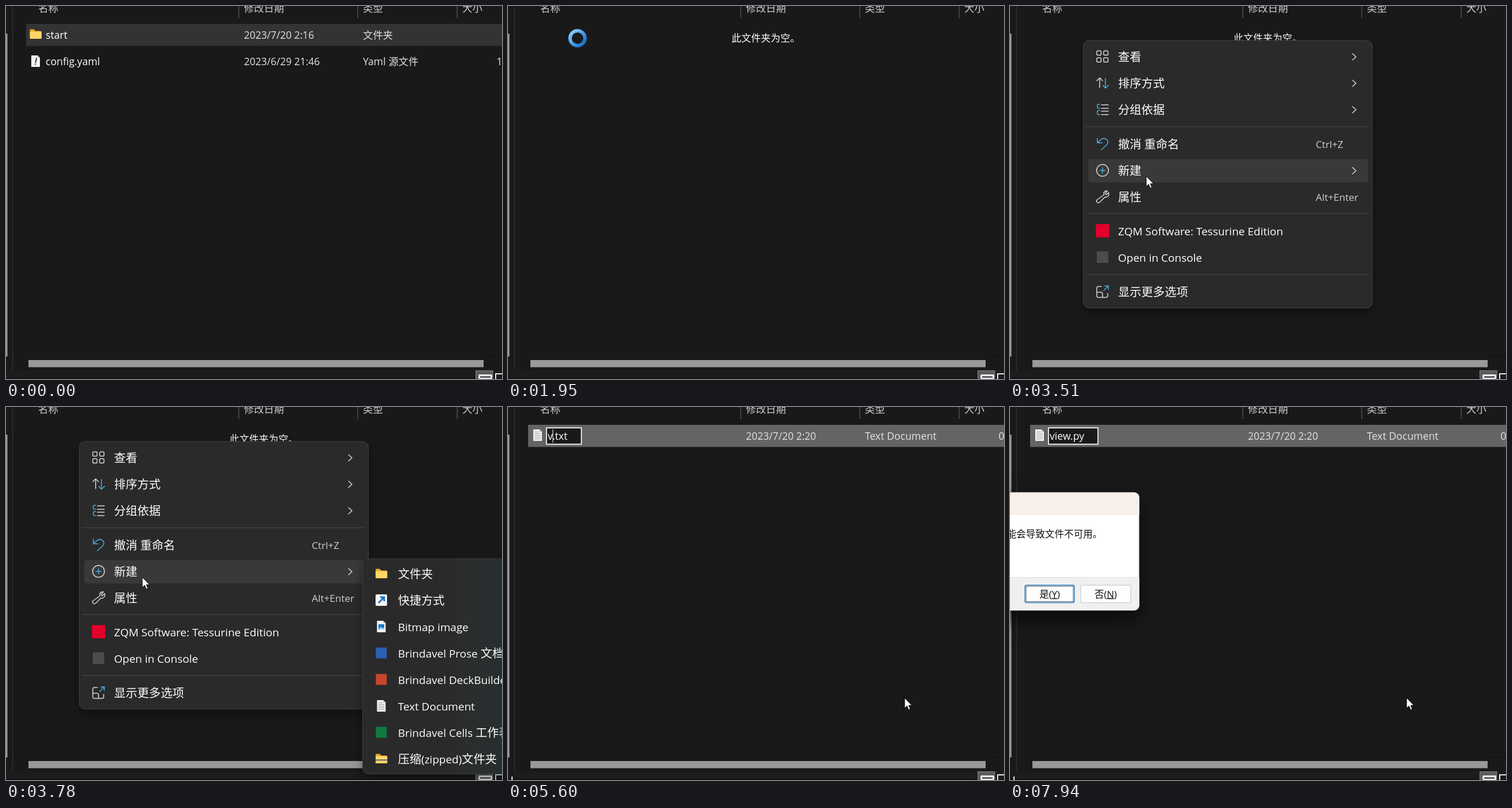
Animation of 863 by 649 pixels, one loop 8 s. Source, as an HTML page:

```html
<!DOCTYPE html>
<html lang="zh-CN">
<head>
<meta charset="utf-8">
<title>File list</title>
<style>
html, body { margin: 0; width: 100%; height: 100%; overflow: hidden; background: #191919; }
svg { display: block; width: 100vw; height: 100vh; }
text { font-family: "Open Sans", "Noto Sans CJK SC", "Noto Sans CJK", sans-serif; white-space: pre; }
.line { fill: none; stroke: #d6d6d6; stroke-width: 1.5; stroke-linecap: round; stroke-linejoin: round; }
.blue { stroke: #4cb0e0; }
</style>
</head>
<body>
<svg id="stage" viewBox="0 0 863 649" preserveAspectRatio="none" xmlns="http://www.w3.org/2000/svg"></svg>
<script>
const LOOP = 8000, STEP = 67.4, LEAD = 18;
const stage = document.getElementById('stage');

// Latin and CJK runs use slightly different sizes.
function label(x, y, str, fill = '#fff', latin = 17.7, cjk = 17.4, extra = '') {
  const runs = str.split(/([\u3000-\u9fff]+)/).filter(Boolean).map(run =>
    `<tspan font-size="${/[\u3000-\u9fff]/.test(run) ? cjk : latin}">${run}</tspan>`);
  return `<text x="${x}" y="${y}" fill="${fill}" ${extra}>${runs.join('')}</text>`;
}
const rect = (x, y, w, h, fill, extra = '') =>
  `<rect x="${x}" y="${y}" width="${w}" height="${h}" fill="${fill}" ${extra}/>`;
const line = (d, cls = '') => `<path class="line ${cls}" d="${d}"/>`;
const group = (id, body, extra = '') => `<g id="${id}" ${extra}>${body}</g>`;
const at = (x, y, body) => `<g transform="translate(${x} ${y})">${body}</g>`;

// Icons are drawn around their own centre.
const folder = '<path d="M-10 -7q0 -1.5 1.5 -1.5h5.5l3 3h8.500q1.500 0 1.500 1.500v4h-20z" fill="#e8a826"/>' +
  rect(-10, -4.5, 20.5, 12.5, '#ffd666', 'rx="1.3"');
const page = '<path d="M-7.500 -10h11l4 4v16h-15z" fill="#f4f4f4"/><path d="M3.500 -10v4h4z" fill="#bbb"/>';
const textPage = page +
  [-6, -3, 0, 3, 6].map(y => rect(-5.5, y, y < -5 ? 8 : 11, 1, '#999')).join('');
const square = (fill, size) => rect(-size / 2, -size / 2, size, size, fill);

const icons = {
  view: [-10, 2].map(x => [-10, 2].map(y =>
    `<rect class="line" x="${x}" y="${y}" width="7.500" height="7.500" rx="1.800"/>`).join('')).join(''),
  sort: line('M-5 8V-9M-10 -4L-5 -9L0 -4') + line('M5 -8V9M0.500 4L5 9L10.500 4', 'blue'),
  list: line('M-2 -8H10M-2 -2H10M-2 3H10M-2 9H10') +
    line('M-5 -9h-2q-2 0 -2 2v3q0 2 2 2h2M-5 2h-2q-2 0 -2 2v3q0 2 2 2h2', 'blue'),
  undo: line('M-9 -10V-2H-1M-9 -2L-3 -7.500Q3 -12 8 -7Q11 -2 7 2L-2 10', 'blue'),
  plus: '<circle class="line" r="10.300"/>' + line('M-4.500 0H4.500M0 -4.500V4.500', 'blue'),
  wrench: line('M2.500 -3.500Q1 -8 5 -10Q7 -11 8.500 -10.300L4.500 -6L6.500 -3.500L10.500 -7.500Q12 -3 9 -0.500Q7 1 4 0.500L-5 9.500Q-7.500 11.500 -9.700 9.300Q-11.300 7 -9.300 5Z'),
  app: square('#e4002b', 23),
  shell: square('#4c4c4c', 20),
  more: line('M-2 -9H-7q-3 0 -3 3V7q0 3 3 3H6q3 0 3 -3V3M-10 1h7q3 0 3 3v6') +
    line('M2 -2L10 -10M4 -10H10V-4', 'blue'),
};

const menuItems = [
  [89, 'view', '查看', '>'], [135, 'sort', '排序方式', '>'], [181, 'list', '分组依据', '>'],
  [241, 'undo', '撤消 重命名', 'Ctrl+Z'], [287, 'plus', '新建', '>'], [333, 'wrench', '属性', 'Alt+Enter'],
  [392, 'app', 'ZQM Software: Tessurine Edition'], [438, 'shell', 'Open in Console'], [498, 'more', '显示更多选项'],
];
const newItems = [
  ['文件夹', folder],
  ['快捷方式', rect(-10, -10, 20, 20, '#f5f5f5', 'rx="2"') +
    '<path d="M-5 5L4 -4M-2 -5H5V2" fill="none" stroke="#1573c9" stroke-width="2.800"/>'],
  ['Bitmap image', page + rect(-5, -4, 10, 9, '#1e78d0') + '<path d="M-5 5l4 -5 3 3 1.500 -1.500 1.500 2v1.500z" fill="#8fd0ff"/>'],
  ['Brindavel Prose 文档', square('#2b5fb4', 19)],
  ['Brindavel DeckBuilder', square('#c8452a', 19)],
  ['Text Document', textPage],
  ['Brindavel Cells 工作表', square('#107c41', 19)],
  ['压缩(zipped)文件夹', folder + rect(-10, 1, 20.5, 2.5, '#777')],
].map((item, i) => [291 + 46 * i, ...item]);

const menuRow = ([y, icon, name, tail]) => at(161, y - 1, icons[icon]) +
  label(188, y + 7.3, name, '#fff', 19, 20.3) +
  (tail === '>' ? line(`M596 ${y - 6}l6 5.500l-6 5.500`) : tail ? label(532, y + 6, tail, '#cfcfcf', 17.2) : '');

const fileRow = (y, date, type, size) => label(414, y, date, '#e2e2e2', 17.5) +
  label(621, y, type, '#e2e2e2') + label(853.5, y, size, '#e2e2e2');

const button = (x, w, word, key, edge) =>
  rect(x, 310, w, 30.5, '#fdfdfd', `rx="3" stroke="${edge}" stroke-width="1.500"`) +
  `<text x="${x + w / 2}" y="331.500" font-size="16.600" text-anchor="middle" fill="#111">${word}(<tspan text-decoration="underline">${key}</tspan>)</text>`;

stage.innerHTML = `<defs>
  <filter id="soft" x="-20%" y="-20%" width="140%" height="150%"><feDropShadow dx="0" dy="8" stdDeviation="9" flood-opacity=".4"/></filter>
  <filter id="deep" x="-40%" y="-40%" width="180%" height="200%"><feDropShadow dx="0" dy="16" stdDeviation="18" flood-opacity=".6"/></filter>
  <linearGradient id="panel"><stop offset=".5" stop-color="#2c2c2c"/><stop offset="1" stop-color="#253132"/></linearGradient>
  <linearGradient id="spin" x2="1" y2="1"><stop stop-color="#8fd3ff"/><stop offset="1" stop-color="#0a66c8"/></linearGradient>
  <clipPath id="card"><rect x="-40" y="148.500" width="265" height="205.500" rx="9"/></clipPath>
</defs>` +
  rect(0, 0, 863, 649, '#191919') +
  rect(0, 634, 863, 15, '#1c1c1c') + rect(0, 647.5, 863, 1.5, '#100c0c') +
  rect(-3, 48, 5.5, 562, '#9a9a9a', 'rx="1"') + rect(10.5, 0, 2, 634, '#2b2b2b') +
  [[56, '名称'], [414, '修改日期'], [621, '类型'], [794, '大小']].map(h => label(h[0], 10, h[1], '#d0d0d0')).join('') +
  [405, 612, 785].map(x => rect(x - 0.5, 0, 1, 21, '#6a6a6a')).join('') +
  rect(831, 609, 32, 1, '#101010') + rect(39, 616, 792, 12.5, '#999') +
  rect(817.5, 634.5, 29.5, 20, '#5c5c5c', 'stroke="#858585"') +
  rect(822, 641, 24, 8, '#e8e8e8', 'rx="2"') + rect(825, 644.5, 18, 2, '#222') +
  rect(852, 640, 14, 12, 'none', 'stroke="#e8e8e8" stroke-width="2"') +
  group('files', rect(35, 31, 828, 38.5, '#333', 'id="row"') + at(51.5, 49, folder) +
    label(69, 56.5, 'start') + fileRow(56.5, '2023/7/20 2:16', '文件夹', '') +
    at(51.5, 96, page + '<path d="M1.500 -5L0 2M-0.600 5v0.500" stroke="#333" stroke-width="2" stroke-linecap="round"/>') +
    label(69, 103, 'config.yaml') + fileRow(103, '2023/6/29 21:46', 'Yaml 源文件', '1')) +
  group('empty', label(389, 61.5, '此文件夹为空。', '#fff', 17, 17)) +
  group('draft', rect(35, 31, 828, 38.5, '#646464') + at(51.5, 49, textPage) +
    fileRow(56.5, '2023/7/20 2:20', 'Text Document', '0') + rect(6, 643, 2, 6, '#eee') +
    rect(67, 36.3, 62, 28.4, '#191919', 'id="field" stroke="#fff" stroke-width="1.700"') +
    rect(69, 39, 0, 23, '#0078d7', 'id="mark"') +
    '<text id="name" x="69" y="56.500" font-size="17.700" fill="#fff"></text>' +
    rect(69, 39, 1, 23, '#fff', 'id="caret"')) +
  group('menu', rect(127.5, 60, 503, 465.5, '#2c2c2c', 'rx="10" stroke="#404040" filter="url(#soft)"') +
    rect(136, 0, 487, 40.5, '#393939', 'id="hover" rx="5"') +
    [210, 361, 467].map(y => rect(132, y - 0.5, 492, 1.3, '#434343')).join('') + menuItems.map(menuRow).join('')) +
  group('sub', rect(620.5, 264, 300, 374.5, 'url(#panel)', 'rx="10" stroke="#3c3c3c" filter="url(#soft)"') +
    rect(628, 0, 270, 40.5, '#3a3d3d', 'id="pick" rx="5"') +
    newItems.map(([y, name, icon]) => at(653, y - 1, icon) + label(682, y + 7.3, name, '#fff', 19, 20.3)).join('')) +
  group('dialog', rect(-40, 148.5, 265, 205.5, '#fff', 'rx="9" stroke="#3d463d" filter="url(#deep)"') +
    `<g clip-path="url(#card)">${rect(-40, 148, 270, 40, '#f9f0ec')}${rect(-40, 296, 270, 60, '#f0f0f0')}${rect(-40, 296, 270, 1, '#dfdfdf')}</g>` +
    label(-5.5, 227, '能会导致文件不可用。', '#111', 16.6, 16.6) +
    button(26, 86, '是', 'Y', '#2b80c5') + rect(28, 312, 82, 26.5, 'none', 'stroke="#333" stroke-width=".8"') +
    button(123, 87, '否', 'N', '#d2d2d2')) +
  group('ring', '<circle r="13" fill="none" stroke="url(#spin)" stroke-width="6"/>') +
  group('pointer', '<path d="M0 0V18.200L4.200 14.300L7.100 21L10 19.700L7.200 13.200H12.800Z" fill="#fff" stroke="#000" stroke-width="1"/>');

const el = {};
stage.querySelectorAll('[id]').forEach(node => el[node.id] = node);
const set = (node, attrs) => { for (const k in attrs) node.setAttribute(k, attrs[k]); };

// step, x, y
const path = [
  [4, 845, 598], [6, 600, 420], [8, 390, 260], [10, 240, 143], [12, 127, 61], [13, 122, 57], [14, 122, 57], [15, 121, 57],
  [40, 121, 57], [41, 129, 80], [44, 175, 165], [47, 222, 282], [49, 237, 316], [52, 237, 296],
  [56, 237, 296], [60, 570, 312], [62, 662, 390], [64, 690, 508], [70, 690, 508], [71, 690, 506],
];
// step, name, caret index (-1: hidden), selected length
const typing = [
  [71, 'New Text Document.txt', 17, 17], [79, 'New Text Document.txt', -1, 17],
  [83, 'v.txt', 1], [85, 'vi.txt', 2], [86, 'vie.txt', 3], [88, 'view.txt', 4], [94, 'view.txt', 8],
  [99, 'view.tx', 7], [102, 'view.t', 6], [104, 'view.', 5], [110, 'view.p', 6], [112, 'view.py', 7], [117, 'view.py', -1],
];

function pointerAt(s) {
  const i = path.findIndex(p => p[0] > s);
  if (i < 0) return path[path.length - 1].slice(1);
  if (i === 0) return path[0].slice(1);
  const a = path[i - 1], b = path[i], k = (s - a[0]) / (b[0] - a[0]);
  return [a[1] + (b[1] - a[1]) * k, a[2] + (b[2] - a[2]) * k];
}

const opening = (s, from) => [0.5, 0.85][s - from] ?? (s < from ? 0 : 1);
const rowUnder = (items, y) => items.find(item => Math.abs(item[0] - y) <= 20.5);

function highlight(node, item) {
  set(node, item ? { y: item[0] - 20.5, opacity: 1 } : { opacity: 0 });
}

function drawName(s) {
  const [, name, caret, picked = 0] = typing.filter(k => k[0] <= s).pop() || typing[0];
  const widthOf = n => n > 0 ? el.name.getSubStringLength(0, n) : 0;
  el.name.textContent = name;
  set(el.field, { width: el.name.getComputedTextLength() + 26 });
  set(el.mark, { width: widthOf(picked) });
  set(el.caret, { x: 69 + widthOf(caret), opacity: caret < 0 ? 0 : 1 });
}

function update(t) {
  const s = Math.floor((t + LEAD) / STEP);
  const [x, y] = pointerAt(s), busy = s >= 29 && s < 32;
  set(el.row, { fill: s < 11 ? '#333' : s < 12 ? '#555' : s < 19 ? '#777775' : '#666' });
  set(el.files, { opacity: s < 20 ? 1 : s < 21 ? 0.3 : 0 });
  set(el.empty, { opacity: s >= 22 && s < 71 ? 1 : 0 });
  set(el.draft, { opacity: s >= 71 ? 1 : 0 });

  const shown = opening(s, 32), subShown = opening(s, 53);
  set(el.menu, {
    opacity: s < 68 ? shown : s < 69 ? 0.6 : s < 70 ? 0.22 : 0,
    transform: `translate(0 ${-12 * (1 - shown)})`,
  });
  set(el.sub, { opacity: s < 68 ? subShown : 0, transform: `translate(0 ${-10 * (1 - subShown)})` });
  const over = s >= 68 ? null : s >= 53 ? menuItems[4] : x >= 136 && x < 623 ? rowUnder(menuItems, y) : null;
  highlight(el.hover, over);
  highlight(el.pick, x >= 628 ? rowUnder(newItems, y) : null);

  drawName(s);
  set(el.dialog, { opacity: s < 117 ? 0 : s < 118 ? 0.45 : 1 });
  set(el.ring, { transform: `translate(${x} ${y - 1})`, opacity: busy ? 1 : 0 });
  set(el.pointer, { transform: `translate(${x} ${y})`, opacity: s >= 4 && !busy ? 1 : 0 });
}

const start = performance.now();
function tick(now) {
  update(Math.max(0, now - start) % LOOP);
  requestAnimationFrame(tick);
}
update(0);
requestAnimationFrame(tick);
</script>
</body>
</html>
```
